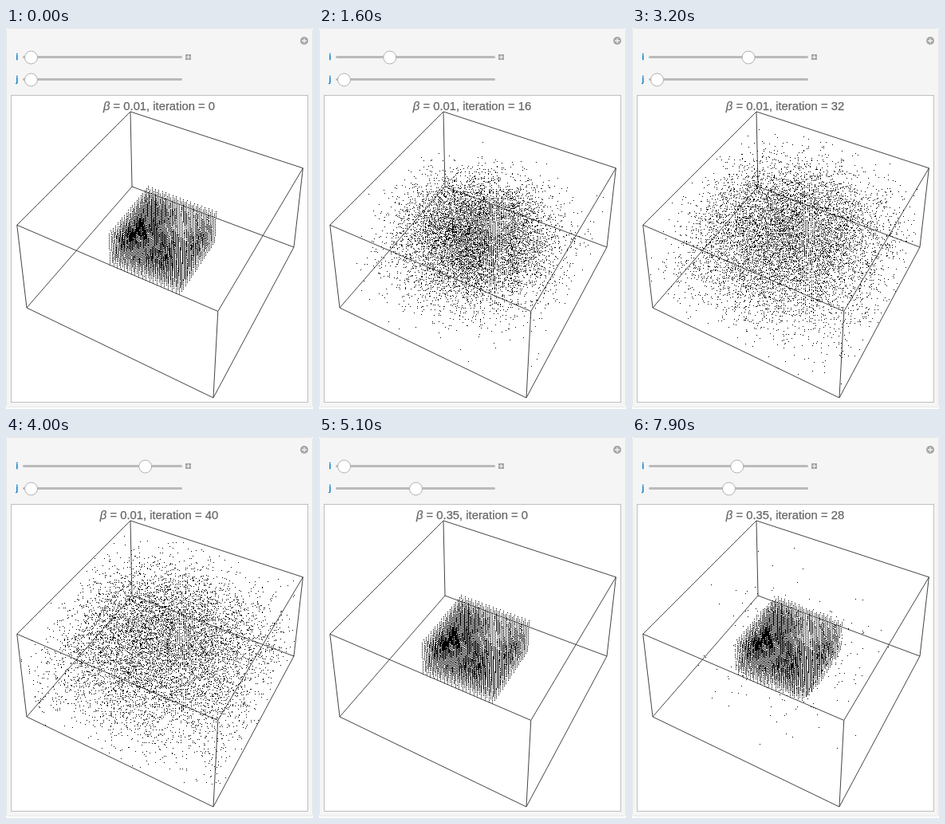
An HTML page with a canvas for the animation above (8 s loop, 385x478 px).

```html
<!DOCTYPE html>
<html lang="en">
<head>
<meta charset="utf-8">
<title>Lattice gas</title>
<style>
html, body { margin: 0; width: 100%; height: 100%; overflow: hidden; background: #fff; }
svg, canvas { position: absolute; left: 0; top: 0; }
text { font-family: "Liberation Sans", Arial, sans-serif; }
.label { font-size: 11px; fill: #0a7cc4; stroke: #0a7cc4; stroke-width: .5; }
.title { font-size: 14.8px; fill: #666; stroke: #666; stroke-width: .25; text-anchor: middle; }
.track { stroke: #bababa; stroke-width: 3; stroke-linecap: round; }
.knob { fill: #fff; stroke: #b0b0b0; }
.plus { stroke: #f5f5f5; fill: none; }
</style>
</head>
<body>
<svg width="385" height="478">
  <rect x=".5" y=".5" width="384" height="475" rx="2" fill="#f5f5f5" stroke="#e6e6e6"/>
  <circle cx="374" cy="16" r="5" fill="#a6a6a6"/>
  <path class="plus" d="M371 16h6M374 13v6" stroke-width="1.3"/>
  <text class="label" x="12.5" y="40">i</text>
  <text class="label" x="12.5" y="68">j</text>
  <path class="track" d="M22.5 36.5H219.5M22.5 64.5H219.5"/>
  <rect x="225" y="33" width="7" height="7" fill="#a6a6a6"/>
  <path class="plus" d="M226 36.5h5M228.5 34v5"/>
  <circle class="knob" id="knobI" cy="37" r="8"/>
  <circle class="knob" id="knobJ" cy="65" r="8"/>
  <rect x="6.5" y="84.5" width="372" height="385" fill="#fff" stroke="#bfbfbf"/>
  <path id="box" fill="none" stroke="#444"/>
  <text class="title" x="192" y="103"><tspan font-style="italic">β</tspan><tspan id="caption"></tspan></text>
</svg>
<canvas id="dots" width="385" height="478"></canvas>
<script>
const $ = id => document.getElementById(id);
const ctx = $("dots").getContext("2d");

// Perspective view of the unit box.
function project(u, v, w) {
  const d = 1 - .0926 * u - .1725 * v - .057 * w;
  return [
    (158 + 169.57 * u - 136.5 * v - 10.9 * w) / d,
    (199 + 50.5 * u + 91.46 * v - 100 * w) / d
  ];
}

function boxPath() {
  const corner = (u, v, w) => project(u, v, w).join(" ");
  const ring = w => `M${corner(0, 0, w)}L${corner(1, 0, w)}L${corner(1, 1, w)}L${corner(0, 1, w)}Z`;
  const post = (u, v) => `M${corner(u, v, 0)}L${corner(u, v, 1)}`;
  return ring(0) + ring(1) + post(0, 0) + post(1, 0) + post(1, 1) + post(0, 1);
}

function randomizer(seed) {
  return () => {
    seed = (seed + 0x6D2B79F5) | 0;
    let t = Math.imul(seed ^ (seed >>> 15), 1 | seed);
    t = (t + Math.imul(t ^ (t >>> 7), 61 | t)) ^ t;
    return ((t ^ (t >>> 14)) >>> 0) / 4294967296;
  };
}

const SIZE = 50, SIDE = 20, PAD = SIZE + 2, PLANE = PAD * PAD;
const STEPS = [1, -1, PAD, -PAD, PLANE, -PLANE];
const TRIES = 85000;
const EMPTY = 0, FULL = 1, WALL = 2;

function snapshot(sites) {
  const pixels = new Int16Array(sites.length * 2);
  sites.forEach((s, n) => {
    const i = s % PAD - 1, j = Math.floor(s / PAD) % PAD - 1, k = Math.floor(s / PLANE) - 1;
    const [x, y] = project(.007 + .0202 * i, .009 + .0202 * j, .007 + .0202 * k);
    pixels[2 * n] = Math.round(x);
    pixels[2 * n + 1] = Math.round(y);
  });
  return pixels;
}

// Particles hop to free neighbour sites under the Metropolis rule.
function simulate(beta, count, seed) {
  const random = randomizer(seed);
  const grid = new Uint8Array(PAD ** 3).fill(WALL);
  const sites = [];
  const inBlock = (n, from) => n >= from && n < from + SIDE;
  for (let k = 0; k < SIZE; k++)
    for (let j = 0; j < SIZE; j++)
      for (let i = 0; i < SIZE; i++) {
        const s = i + 1 + (j + 1) * PAD + (k + 1) * PLANE;
        const full = inBlock(i, 14) && inBlock(j, 15) && inBlock(k, 14);
        grid[s] = full ? FULL : EMPTY;
        if (full) sites.push(s);
      }
  const bonds = s => STEPS.reduce((sum, d) => sum + (grid[s + d] & 1), 0);
  const frames = [snapshot(sites)];
  while (frames.length < count) {
    for (let n = 0; n < TRIES; n++) {
      const p = Math.floor(random() * sites.length);
      const from = sites[p], to = from + STEPS[Math.floor(random() * 6)];
      if (grid[to] !== EMPTY) continue;
      const cost = 4 * (bonds(from) - bonds(to) + 1);
      if (cost > 0 && random() >= Math.exp(-beta * cost)) continue;
      grid[from] = EMPTY;
      grid[to] = FULL;
      sites[p] = to;
    }
    frames.push(snapshot(sites));
  }
  return frames;
}

const runs = [
  { beta: "0.01", knob: 31.5, frames: simulate(.01, 51, 11) },
  { beta: "0.35", knob: 121.5, frames: simulate(.35, 29, 29) }
];
$("box").setAttribute("d", boxPath());

let shown = -1;
function draw(now) {
  const step = Math.floor((now - start) / 100) % 80;
  if (step !== shown && step >= 0) {
    shown = step;
    const run = runs[step < 51 ? 0 : 1];
    const i = step % 51;
    $("knobI").setAttribute("cx", 31.5 + 3.58 * i);
    $("knobJ").setAttribute("cx", run.knob);
    $("caption").textContent = ` = ${run.beta}, iteration = ${i}`;
    ctx.clearRect(0, 0, 385, 478);
    const pixels = run.frames[i];
    for (let n = 0; n < pixels.length; n += 2) ctx.fillRect(pixels[n], pixels[n + 1], 1, 1);
  }
  requestAnimationFrame(draw);
}
const start = performance.now();
draw(start);
</script>
</body>
</html>
```
